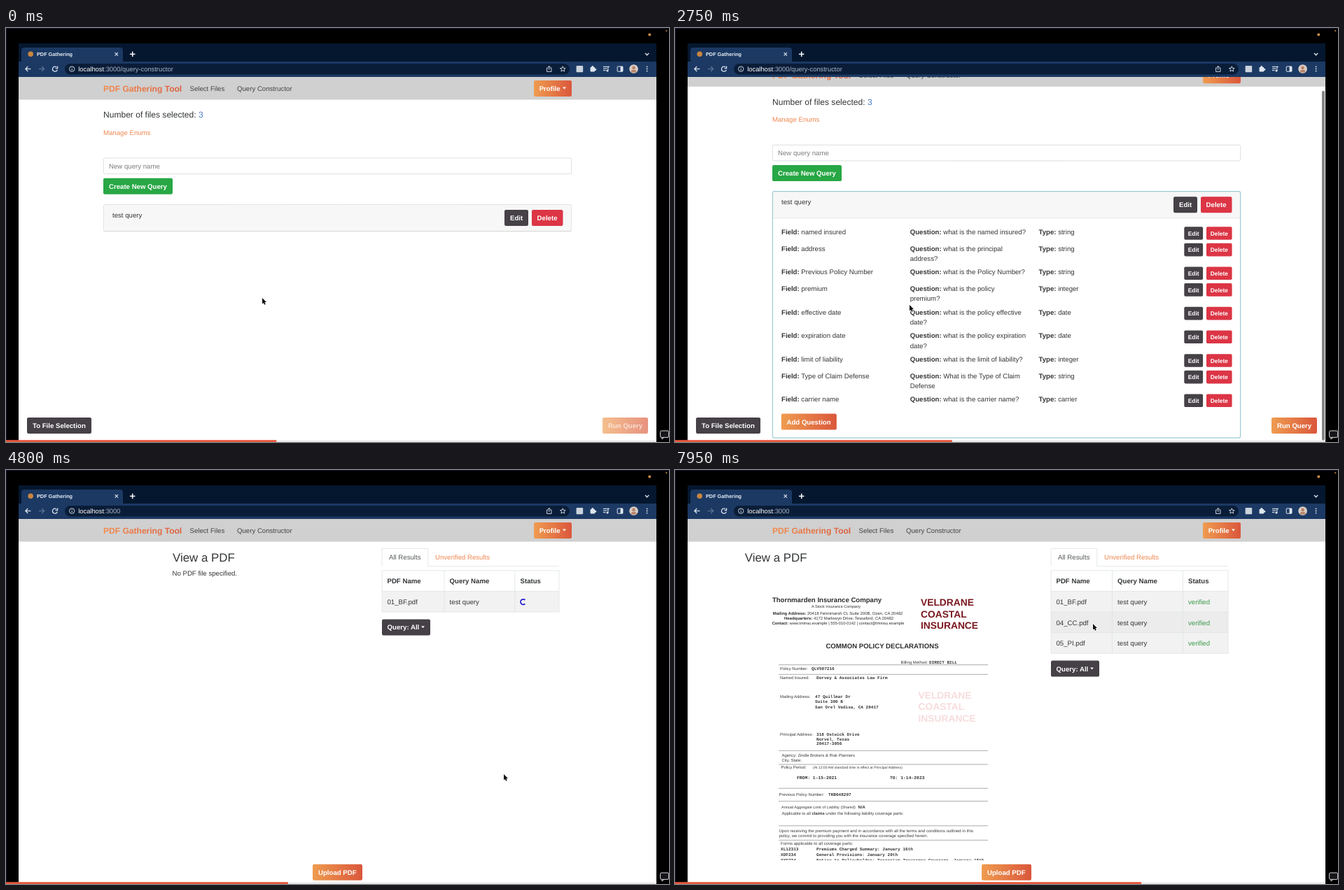
Animation, 947 px wide and 592 px high, one loop 8000 ms. Source, as an HTML page with a canvas:

```html
<!DOCTYPE html>
<html lang="en">
<head>
<meta charset="utf-8">
<title>PDF Gathering Tool</title>
<style>
html, body { margin: 0; width: 100%; height: 100%; overflow: hidden; background: #000; }
canvas { display: block; width: 947px; height: 592px; }
</style>
</head>
<body>
<canvas id="stage"></canvas>
<script>
const W = 947, H = 592, LOOP = 8000;
const canvas = document.getElementById('stage');
const dpr = window.devicePixelRatio || 1;
canvas.width = W * dpr;
canvas.height = H * dpr;
const c = canvas.getContext('2d');

const SANS = '"Liberation Sans", Arial, sans-serif';
const MONO = '"Liberation Mono", monospace';
const INK = '#343638', DARK = '#454146', RED = '#dc3545', ORANGE = '#ef8750', LINE = '#dee2e6';
const BODY = 9.64, SMALL = 8.44;

// Times of the state changes, in ms
const OPEN = 1020, SCROLL = 2250, RUN = 4150, ROWS = [4350, 5000, 5450], DONE = 6900, VIEW = 7500;

const clamp = v => Math.max(0, Math.min(1, v));
const span = (t, a, b) => clamp((t - a) / (b - a));
const smooth = v => v * v * (3 - 2 * v);
const easeOut = v => 1 - (1 - v) ** 3;

// CSS "ease": cubic-bezier(.25, .1, .25, 1)
function cssEase(x) {
  let lo = 0, hi = 1, s = 0.5;
  for (let i = 0; i < 20; i++) {
    s = (lo + hi) / 2;
    const bx = 0.75 * s * (1 - s) ** 2 + 0.75 * s * s * (1 - s) + s ** 3;
    if (bx < x) lo = s; else hi = s;
  }
  return 0.3 * s * (1 - s) ** 2 + 3 * s * s * (1 - s) + s ** 3;
}

// Text whose capitals are centred on y; parts between * are bold
function text(str, x, y, size = BODY, color = INK, o = {}) {
  const parts = str.split('*').map((s, i) => [s, (i % 2 ? !o.bold : o.bold) ? 'bold' : 'normal']);
  const font = w => `${w} ${size}px ${o.mono ? MONO : SANS}`;
  const width = ([s, w]) => { c.font = font(w); return c.measureText(s).width; };
  c.fillStyle = color;
  if (o.center) x -= parts.reduce((sum, p) => sum + width(p), 0) / 2;
  for (const p of parts) {
    const w = width(p);
    c.fillText(p[0], x, y + size * 0.358);
    x += w;
  }
}
const bold = (s, x, y, size, color) => text(s, x, y, size, color, { bold: true });
const mono = (s, x, y, size = 6.06) => text(s, x, y, size, '#333', { mono: true, bold: true });

function rect(x, y, w, h, color) {
  c.fillStyle = color;
  c.fillRect(x, y, w, h);
}
function box(x, y, w, h, r, fill, stroke, lw = 0.8) {
  c.beginPath();
  c.roundRect(x, y, w, h, r);
  if (fill) { c.fillStyle = fill; c.fill(); }
  if (stroke) { c.strokeStyle = stroke; c.lineWidth = lw; c.stroke(); }
}
function path(pts, color, lw = 1.2) {
  c.beginPath();
  for (let i = 0; i < pts.length; i += 2) c.lineTo(pts[i], pts[i + 1]);
  c.strokeStyle = color;
  c.lineWidth = lw;
  c.stroke();
}
function disc(x, y, r, color) {
  c.beginPath();
  c.arc(x, y, r, 0, 7);
  c.fillStyle = color;
  c.fill();
}
function arc(x, y, r, a, b, color, lw) {
  c.beginPath();
  c.arc(x, y, r, a, b);
  c.strokeStyle = color;
  c.lineWidth = lw;
  c.stroke();
}
function clipped(x, y, w, h, draw) {
  c.save();
  c.beginPath();
  c.rect(x, y, w, h);
  c.clip();
  draw();
  c.restore();
}
function warm(x, w, a = '#ef9c50', b = '#da573b') {
  const g = c.createLinearGradient(x, 0, x + w, 0);
  g.addColorStop(0, a);
  g.addColorStop(1, b);
  return g;
}
function caret(x, y) {
  c.beginPath();
  c.moveTo(x, y - 1.4);
  c.lineTo(x + 5, y - 1.4);
  c.lineTo(x + 2.5, y + 1.4);
  c.fillStyle = '#fff';
  c.fill();
}
function button(label, x, y, w, fill, pad = 7.7) {
  box(x, y, w, 23, 2.2, fill);
  bold(label, x + pad, y + 11.5, BODY, '#fff');
}
function smallButton(label, x, y, w, fill) {
  box(x, y, w, 18.6, 1.8, fill);
  text(label, x + w / 2, y + 9.4, SMALL, '#fff', { bold: true, center: true });
}

function navbar() {
  rect(18, 70, 911, 32.5, '#d0d0d0');
  bold('PDF Gathering Tool', 139, 86.3, 12.05, warm(139, 114, '#f28b4c', '#d95f3f'));
  text('Select Files', 262.5, 86.3, BODY, '#444');
  text('Query Constructor', 330, 86.3, BODY, '#444');
  button('Profile', 754, 75, 54, warm(754, 54));
  caret(795, 86);
}

const questions = [
  ['named insured', 'what is the named insured?', '', 'string'],
  ['address', 'what is the principal', 'address?', 'string'],
  ['Previous Policy Number', 'what is the Policy Number?', '', 'string'],
  ['premium', 'what is the policy', 'premium?', 'integer'],
  ['effective date', 'what is the policy effective', 'date?', 'date'],
  ['expiration date', 'what is the policy expiration', 'date?', 'date'],
  ['limit of liability', 'what is the limit of liability?', '', 'integer'],
  ['Type of Claim Defense', 'What is the Type of Claim', 'Defense', 'string'],
  ['carrier name', 'what is the carrier name?', '', 'carrier']
];

function questionList() {
  let y = 310.2;
  for (const [field, q, more, type] of questions) {
    text('*Field:* ' + field, 152, y);
    text('*Question:* ' + q, 335.7, y);
    text(more, 335.7, y + 14.3);
    text('*Type:* ' + type, 519.5, y);
    smallButton('Edit', 727.3, y - 7.3, 26.8, DARK);
    smallButton('Delete', 759, y - 7.3, 36.6, RED);
    y += more ? 33.7 : 23.6;
  }
  button('Add Question', 151.8, 570.3, 79, warm(152, 79));
}

function queryPage(t) {
  const open = t >= OPEN;
  const grow = 314 * cssEase(span(t, OPEN, OPEN + 350));
  const scroll = 18.7 * easeOut(span(t, SCROLL, SCROLL + 400));
  c.save();
  c.translate(0, -scroll);
  navbar();
  text('Number of files selected:', 139, 124, 12.05);
  text('3', 275, 124, 12.05, '#4a7cc4');
  text('Manage Enums', 139, 149.6, BODY, ORANGE);
  box(139.3, 186, 668.4, 22.6, 2.2, '#fff', '#d3d6d9');
  text('New query name', 147, 197.6, BODY, '#7a7d80');
  button('Create New Query', 139, 214.8, 99, '#28a745', 8);

  const frame = open ? '#9ccad3' : '#dcdcdc';
  box(139.4, 252.4, 668.2, 38.4 + grow, 2.4, '#fff');
  rect(139.6, 252.6, 667.8, 38, '#f7f7f7');
  rect(139.6, 290.2, 667.8, 0.8, open ? '#e4e4e4' : '#cfcfcf');
  if (open) clipped(139, 291, 670, grow, questionList);
  box(139.4, 252.4, 668.2, 38.4 + grow, 2.4, null, frame, open ? 1.2 : 0.8);
  text('test query', 152, 267.3);
  button('Edit', 712, 260, 34, DARK, 8);
  button('Delete', 751, 260, 44.5, RED, 7.6);
  c.restore();

  button('To File Selection', 30, 557, 92, DARK, 8);
  c.globalAlpha = open ? 1 : 0.65;
  button('Run Query', 852, 557, 65, warm(852, 65), 8);
  c.globalAlpha = 1;

  const bar = span(t, SCROLL, SCROLL + 60) * (1 - span(t, 3000, 3250));
  if (bar > 0) {
    c.globalAlpha = bar;
    box(924, 71 + scroll, 4, 500, 2, '#858585');
    c.globalAlpha = 1;
  }
}

function spinner(x, y, t, phase) {
  const a = (t - 4800) / 650 * Math.PI * 2 + phase;
  arc(x, y, 3.8, a + Math.PI / 4, a + Math.PI * 1.75, '#2a20d2', 1.8);
}

function results(t) {
  const done = t >= DONE;
  const count = ROWS.filter(r => t >= r).length;
  const bottom = 173.4 + count * 29.6;
  const col1 = done ? 624.5 : 626, col2 = done ? 725.4 : 726.8;
  path([537, 137.6, 537, 112.4, 602.8, 112.4, 602.8, 137.6, 790, 137.6], LINE, 0.8);
  text('All Results', 547, 125, BODY, '#55595c');
  text('Unverified Results', 613, 125, BODY, ORANGE);

  for (let i = 0; i < count; i++) {
    const hover = i === 1 && t >= 7400;
    rect(537, 173.4 + i * 29.6, 253, 29.6, hover ? '#ececec' : i % 2 ? '#fff' : '#f2f2f2');
  }
  for (let i = 0; i <= count + 1; i++) {
    const y = i ? 173.4 + (i - 1) * 29.6 : 143.8;
    path([537, y, 790, y], LINE, 0.8);
  }
  for (const x of [537, col1, col2, 790]) path([x, 143.8, x, bottom], LINE, 0.8);
  bold('PDF Name', 544.5, 158.6);
  bold('Query Name', col1 + 7.6, 158.6);
  bold('Status', col2 + 7.7, 158.6);
  ['01_BF.pdf', '04_CC.pdf', '05_PI.pdf'].slice(0, count).forEach((name, i) => {
    const y = 188.6 + i * 29.6;
    text(name, 544.5, y);
    text('test query', col1 + 7.6, y);
    if (done) text('verified', col2 + 7.6, y, BODY, '#3d9a4c');
    else spinner(738.8, y, t, -i * Math.PI / 2);
  });
  button('Query: All', 537, bottom + 10.4, 69, DARK, 7.6);
  caret(593, bottom + 21.6);
}

function wordmark(x, y, color) {
  ['VELDRANE', 'COASTAL', 'INSURANCE'].forEach((s, i) => bold(s, x, y + i * 16.7, 13.8, color));
}

function policy() {
  const mid = (s, x, y, size, o) => text(s, x, y, size, '#2d2d2d', { center: true, ...o });
  const tiny = (s, x, y, size = 5.9) => text(s, x, y, size, '#3a3a3a');
  mid('Thornmarden Insurance Company', 217, 186, 9.6, { bold: true });
  mid('A Stock Insurance Company', 230, 194.6, 5.55);
  mid('*Mailing Address:* 20418 Fennimarsh Ct, Suite 200B, Ozen, CA 20482', 232.5, 205, 5.95);
  mid('*Headquarters:* 4172 Marlowyn Drive, Tessaford, CA 20482', 234, 212, 5.95);
  mid('*Contact:* www.tminsu.example | 555-010-0142 | contact@tminsu.example', 233, 219, 5.75);
  wordmark(351, 189, '#7a1820');
  wordmark(347.5, 321.6, '#f7dcdd');
  mid('COMMON POLICY DECLARATIONS', 296, 252, 9.6, { bold: true });

  for (const y of [278.6, 292.3, 401.3, 421, 455.2, 473.6, 508.8, 529.3]) path([148, y, 447, y], '#888', 0.7);
  tiny('Billing Method:', 322.5, 275);
  mono('DIRECT BILL', 363, 275);
  tiny('Policy Number:', 150, 284.3);
  mono('QLV507216', 195, 284.3);
  tiny('Named Insured:', 150, 297.3);
  mono('Dorvey & Associates Law Firm', 202, 296.8);
  tiny('Mailing Address:', 150, 323.6);
  ['47 Quillmar Dr', 'Suite 300 B', 'San Orel Vadisa, CA 20417'].forEach((s, i) => mono(s, 200, 323.6 + i * 7.5));
  tiny('Principal Address:', 150, 377.6);
  ['318 Ostwick Drive', 'Norvel, Texas', '20417-3056'].forEach((s, i) => mono(s, 202, 378 + i * 6.4));
  tiny('Agency: Zindle Brokers & Risk Planners', 152.5, 408);
  tiny('City, State:', 152.5, 415);
  tiny('Policy Period:', 151.5, 425);
  tiny('(At 12:00 AM standard time in effect at Principal Address)', 197, 425, 5.05);
  mono('FROM: 1-15-2021', 174, 440, 6.35);
  mono('TO: 1-14-2023', 307, 440, 6.35);
  tiny('Previous Policy Number:', 148.5, 463.7);
  mono('TKB648207', 219, 463.7);
  tiny('Annual Aggregate Limit of Liability (Shared)', 152, 481.8, 5.5);
  bold('N/A', 261.5, 481.8, 5.9, '#333');
  tiny('Applicable to all *claims* under the following liability coverage parts:', 152.5, 490.4);
  tiny('Upon receiving the premium payment and in accordance with all the terms and conditions outlined in this', 148.5, 515.6, 6);
  tiny('policy, we commit to providing you with the insurance coverage specified herein.', 148.5, 522.4, 6);
  tiny('Forms applicable to all coverage parts:', 151, 533.6, 6);
  [['XL12313', 'Premiums Charged Summary: January 16th'],
   ['XDF234', 'General Provisions: January 20th'],
   ['XXF234', 'Notice to Policyholder: Terrorism Insurance Coverage, January 18th']
  ].forEach(([id, title], i) => {
    mono(id, 151, 541.4 + i * 8.2);
    mono(title, 202, 541.4 + i * 8.2);
  });
}

function resultPage(t) {
  const view = t >= VIEW;
  navbar();
  text('View a PDF', view ? 99.8 : 238, 125.2, 16.87);
  if (view) clipped(130, 160, 330, 398, policy);
  else text('No PDF file specified.', 237.5, 148);
  results(t);
  button('Upload PDF', 438, 563.7, 71, warm(438, 71), 8);
}

function browser(t) {
  rect(18, 22, 911, 27, '#05172f');
  rect(18, 48, 911, 22, '#1b3963');
  box(22, 28, 145, 24, [4, 4, 0, 0], '#1b3963');
  disc(35.2, 37.3, 3.8, '#c9853f');
  bold('PDF Gathering', 44, 37.4, 7.3, '#e9eef5');
  const ink = '#dfe6ef';
  path([155.6, 35.2, 160, 39.6], ink, 1.1);
  path([160, 35.2, 155.6, 39.6], ink, 1.1);
  path([177, 37.4, 184.4, 37.4], '#fff', 1.5);
  path([180.7, 33.7, 180.7, 41.1], '#fff', 1.5);
  path([913, 36, 915.6, 38.8, 918.2, 36], ink, 1.3);

  path([35.4, 58.5, 28, 58.5], ink);
  path([31.3, 55, 27.8, 58.5, 31.3, 62], ink);
  path([47, 58.5, 54.4, 58.5], '#5f7694');
  path([51.1, 55, 54.6, 58.5, 51.1, 62], '#5f7694');
  arc(70, 58.6, 3.5, 0.3, 5.4, ink, 1.2);
  path([73.6, 54.6, 73.6, 57.6, 70.6, 57.6], ink, 1.2);

  box(84, 51, 721, 15.6, 7.8, '#0a1d38');
  arc(94.2, 58.6, 3.7, 0, 7, ink, 0.9);
  path([94.2, 58, 94.2, 60.8], ink, 0.9);
  path([94.2, 56.3, 94.2, 57.2], ink, 0.9);
  const host = 'localhost';
  text(host, 103.2, 58.8, 9.35, '#fff');
  const w = c.measureText(host).width;
  text(':3000' + (t < RUN ? '/query-constructor' : ''), 103.2 + w, 58.8, 9.35, '#a9b6c8');

  path([774.4, 57, 772.6, 57, 772.6, 62.4, 779, 62.4, 779, 57, 777.2, 57], ink, 0.9);
  path([775.8, 60, 775.8, 54.4], ink, 0.9);
  path([774, 56.2, 775.8, 54.4, 777.6, 56.2], ink, 0.9);
  c.beginPath();
  for (let i = 0; i < 10; i++) {
    const a = i * Math.PI / 5 - Math.PI / 2, r = i % 2 ? 1.8 : 4;
    c.lineTo(795.3 + r * Math.cos(a), 58.8 + r * Math.sin(a));
  }
  c.closePath();
  c.strokeStyle = ink;
  c.lineWidth = 0.9;
  c.stroke();
  box(814.6, 54, 9.6, 9.2, 1, '#cbd3dc');
  box(834.6, 56, 6.6, 6.6, 0.8, ink);
  disc(837.8, 55.6, 1.5, ink);
  disc(841.8, 59.2, 1.5, ink);
  for (const [y, x] of [[55.4, 861], [58, 858.6], [60.6, 856.6]]) path([853, y, x, y], ink, 1.1);
  path([862, 55.4, 860, 55.4, 860, 61], ink, 1);
  disc(859, 61.2, 1.4, ink);
  box(873.2, 55, 7.8, 7.2, 0.8, null, ink, 1);
  rect(877.6, 55, 3.4, 7.2, ink);
  disc(896.6, 58.5, 6.3, '#d9cdc4');
  disc(896.6, 57, 2.4, '#b98468');
  box(892.9, 60, 7.4, 3.6, [3, 3, 2, 2], '#b98468');
  for (const y of [55.4, 58.5, 61.6]) disc(915.6, y, 0.95, ink);
}

function player(t) {
  rect(0, 0, W, 0.8, '#14143c');
  rect(0, 0, 0.8, H, '#14143c');
  disc(919.3, 9.6, 2, '#c98a45');
  disc(943.3, 4, 1.1, '#c98a45');
  rect(18, 589.4, 911, 2.6, 'rgba(190,190,190,.3)');
  const x = t < DONE ? 386.3 + t * 0.00344 : 666 + (t - 7950) * 0.00344;
  rect(0, 589.2, x, 2.8, '#e9583c');
  box(934.6, 576, 12, 9.4, 1.6, '#15151a', '#d8d8d8', 1);
  path([937, 585.4, 937, 588, 940, 585.4], '#d8d8d8', 1);
}

const track = [
  [0, 366, 386], [200, 366, 386], [950, 277, 284], [1880, 277, 284], [2200, 315, 360],
  [2700, 335, 396], [2800, 335, 396], [3400, 707, 484], [3850, 882, 566], [4250, 882, 566],
  [4750, 711, 435], [5100, 711, 435], [5900, 667, 383], [6900, 660, 376], [7400, 597, 220],
  [8000, 597, 220]
];
function pointer(t) {
  const i = track.findIndex(k => k[0] > t);
  const [t0, x0, y0] = track[i - 1], [t1, x1, y1] = track[i];
  const v = smooth(span(t, t0, t1));
  c.save();
  c.translate(x0 + (x1 - x0) * v, y0 + (y1 - y0) * v);
  c.beginPath();
  [[0, 0], [0, 8.6], [1.9, 6.9], [3.2, 9.8], [4.7, 9.1], [3.5, 6.3], [6, 6.1]].forEach(p => c.lineTo(...p));
  c.closePath();
  c.lineJoin = 'round';
  c.strokeStyle = '#fff';
  c.lineWidth = 1.4;
  c.stroke();
  c.fillStyle = '#111';
  c.fill();
  c.restore();
}

function draw(t) {
  c.setTransform(dpr, 0, 0, dpr, 0, 0);
  c.textRendering = 'geometricPrecision';
  rect(0, 0, W, H, '#000');
  clipped(18, 70, 911, 522, () => {
    rect(18, 70, 911, 522, '#fff');
    (t < RUN ? queryPage : resultPage)(t);
  });
  browser(t);
  pointer(t);
  player(t);
}

const start = performance.now();
function tick() {
  draw((performance.now() - start) % LOOP);
  requestAnimationFrame(tick);
}
tick();
</script>
</body>
</html>
```
